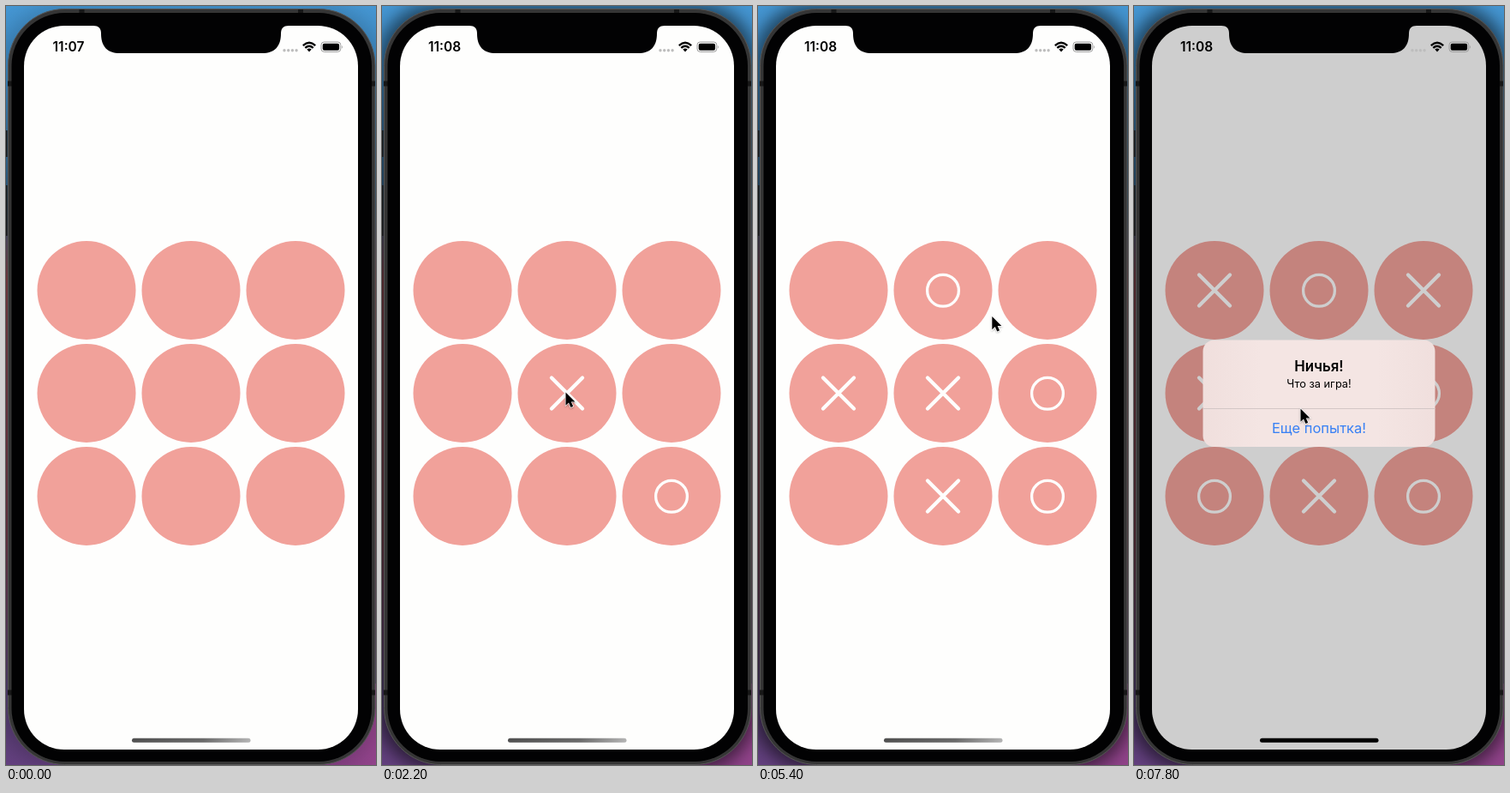
Recreate the animation shown at these times as an HTML page. Size 432 by 885 pixels, loop 8 s.

```html
<!DOCTYPE html>
<html lang="ru">
<head>
<meta charset="utf-8">
<title>Крестики-нолики</title>
<style>
  html, body { margin: 0; width: 100%; height: 100%; overflow: hidden; background: #000; }
  svg { display: block; width: 100%; height: 100%; }
  text { font-family: Inter, "Noto Sans", sans-serif; text-anchor: middle; }
  .mark { fill: none; stroke: #fefefd; stroke-linecap: round; }
</style>
</head>
<body>
<svg viewBox="0 0 432 885">
  <defs>
    <linearGradient id="desk" x2="0" y2="1">
      <stop offset="0" stop-color="#4596d2"/>
      <stop offset=".12" stop-color="#397fb5"/>
      <stop offset=".26" stop-color="#2b5678"/>
      <stop offset=".36" stop-color="#74383f"/>
      <stop offset=".7" stop-color="#64323f"/>
      <stop offset=".9" stop-color="#4c3a68"/>
      <stop offset="1" stop-color="#64407f"/>
    </linearGradient>
    <linearGradient id="magenta">
      <stop offset=".3" stop-color="#91438a" stop-opacity="0"/>
      <stop offset="1" stop-color="#91438a"/>
    </linearGradient>
    <linearGradient id="bar">
      <stop offset="0" stop-color="#505050"/>
      <stop offset=".6" stop-color="#6a6a6a"/>
      <stop offset="1" stop-color="#b4b4b4"/>
    </linearGradient>
    <linearGradient id="glass">
      <stop offset="0" stop-color="#f0dfdd"/>
      <stop offset=".25" stop-color="#f4e5e3"/>
      <stop offset=".75" stop-color="#f4e5e3"/>
      <stop offset="1" stop-color="#f0dfdd"/>
    </linearGradient>
    <filter id="soft" x="-20%" y="-20%" width="140%" height="140%"><feGaussianBlur stdDeviation="9"/></filter>
    <filter id="drop" x="-50%" y="-50%" width="200%" height="200%">
      <feDropShadow dx="0" dy="1" stdDeviation=".8" flood-opacity=".35"/>
    </filter>
    <clipPath id="screen"><rect x="21" y="23" width="390" height="844" rx="47"/></clipPath>
  </defs>

  <rect width="432" height="885" fill="url(#desk)"/>
  <rect y="790" width="432" height="95" fill="url(#magenta)"/>
  <rect id="shadow" x="-4" y="-3" width="440" height="894" rx="66" filter="url(#soft)"/>

  <path d="M.8 145V176M.8 209V268" stroke="#191919" stroke-width="1.6"/>
  <rect x="2.5" y="3.5" width="428.5" height="881" rx="66" fill="#353535" stroke="#555" stroke-width="1"/>
  <path d="M2 90.5H7M426 90.5H431M2 800.5H7M426 800.5H431M88.500 4V9M344 4V9"
        stroke="#171717" stroke-width="6"/>
  <rect x="6.500" y="8" width="420.500" height="873" rx="62" fill="#020203"/>

  <g clip-path="url(#screen)">
    <rect x="21" y="23" width="390" height="844" fill="#fefefd"/>
    <g id="board"></g>
    <rect id="dim" x="21" y="23" width="390" height="844" opacity=".187"/>
  </g>
  <path d="M102 22V23C108 23 111 26 111 32C111 47 118 55 133 55H299C314 55 321 47 321 32C321 26 324 23 330 23V22Z" fill="#020203"/>

  <text id="clock" x="73" y="53.300" font-size="15.500" font-weight="600"></text>
  <path d="M325 51.700H339.500" stroke="#bdbdbd" stroke-width="3.400" stroke-linecap="round" stroke-dasharray="0 4.700"/>
  <g fill="none" stroke="#000" stroke-width="2.300">
    <path d="M346.800 46.100Q354 39.400 361.200 46.100M349.300 48.900Q354 44.700 358.700 48.900"/>
    <path d="M351.300 50.600Q354 48.500 356.700 50.600L354 53.500Z" fill="#000" stroke="none"/>
  </g>
  <rect x="368" y="42" width="22.800" height="11.400" rx="3.400" fill="none" stroke="#9b9b9b"/>
  <rect x="369.700" y="43.700" width="19.400" height="8" rx="2"/>
  <path d="M392 45.700Q393.700 47.700 392 49.700Z" fill="#9b9b9b"/>
  <rect id="home" x="147" y="853.800" width="138.500" height="5" rx="2.500"/>

  <g id="alert">
    <rect x="80.500" y="389.500" width="271" height="124.500" rx="13" fill="url(#glass)"/>
    <path d="M80.500 469.500H351.500" stroke="#d3c7c6"/>
    <text x="216" y="425.500" font-size="16.800" font-weight="600">Ничья!</text>
    <text x="216" y="445.300" font-size="12.800">Что за игра!</text>
    <text x="216" y="498.300" font-size="16.500" fill="#3880f4">Еще попытка!</text>
  </g>

  <path id="cursor" d="M0 0V15.200L3.500 11.900L5.900 17.400L8.700 16.200L6.300 10.900H11Z"
        stroke="#fff" stroke-width="1.200" paint-order="stroke" filter="url(#drop)"/>
</svg>

<script>
const LOOP = 8000, STEP = 200;
const $ = id => document.getElementById(id);
const show = (node, on) => node.setAttribute("visibility", on ? "visible" : "hidden");

// Moves in playing order: column, row, time; crosses go first.
const moves = [
  [1, 1, 1600], [2, 2, 2200], [1, 2, 3000], [1, 0, 3600], [0, 1, 4600],
  [2, 1, 5200], [2, 0, 6000], [0, 2, 6600], [0, 0, 7200]
];

// Pointer stops: time, x, y.
const route = [
  [600, 236, 868], [1000, 213, 566], [1200, 209, 502], [1500, 214, 450], [2300, 214, 450],
  [2800, 218, 556], [3600, 218, 556], [4300, 98, 446], [4800, 98, 446],
  [5700, 334, 332], [6000, 334, 332], [6400, 167, 557], [6600, 140, 550],
  [7100, 99, 348], [7600, 99, 348], [7800, 194, 469]
];

const center = (col, row) => [94 + 122 * col, 331.5 + 120 * row];

function add(tag, attrs) {
  const node = document.createElementNS("http://www.w3.org/2000/svg", tag);
  for (const key in attrs) node.setAttribute(key, attrs[key]);
  return $("board").appendChild(node);
}

for (let i = 0; i < 9; i++) {
  const [cx, cy] = center(i % 3, Math.floor(i / 3));
  add("circle", { cx, cy, r: 57.5, fill: "#f1a19a" });
}

const marks = moves.map(([col, row, time], i) => {
  const [cx, cy] = center(col, row);
  const node = i % 2
    ? add("circle", { class: "mark", cx, cy: cy + 0.3, r: 18.4, "stroke-width": 3.3 })
    : add("path", {
        class: "mark", "stroke-width": 4.3,
        d: `M${cx - 18} ${cy - 18}l36 36m0-36l-36 36`
      });
  return { node, time };
});

function pointerAt(t) {
  const next = route.findIndex(stop => stop[0] > t);
  if (next < 0) return route[route.length - 1].slice(1);
  if (next === 0) return route[0].slice(1);
  const [t0, x0, y0] = route[next - 1], [t1, x1, y1] = route[next];
  const k = (t - t0) / (t1 - t0);
  const ease = t1 - t0 > 400 ? k * k * (3 - 2 * k) : k;
  return [x0 + (x1 - x0) * ease, y0 + (y1 - y0) * ease];
}

function draw(now) {
  const t = Math.floor((now % LOOP) / STEP) * STEP;
  for (const { node, time } of marks) show(node, t >= time);
  const [x, y] = pointerAt(t);
  $("cursor").setAttribute("transform", `translate(${x + 0.5} ${y + 0.5})`);
  show($("cursor"), t >= route[0][0]);
  $("clock").textContent = t < 2000 ? "11:07" : "11:08";
  $("shadow").setAttribute("opacity", t < 400 ? 0.12 : 0.5);
  $("home").setAttribute("fill", t < 7000 ? "url(#bar)" : "#000");
  show($("dim"), t >= 7800);
  show($("alert"), t >= 7800);
}

const start = performance.now();
function tick() {
  draw(performance.now() - start);
  requestAnimationFrame(tick);
}
tick();
</script>
</body>
</html>
```
